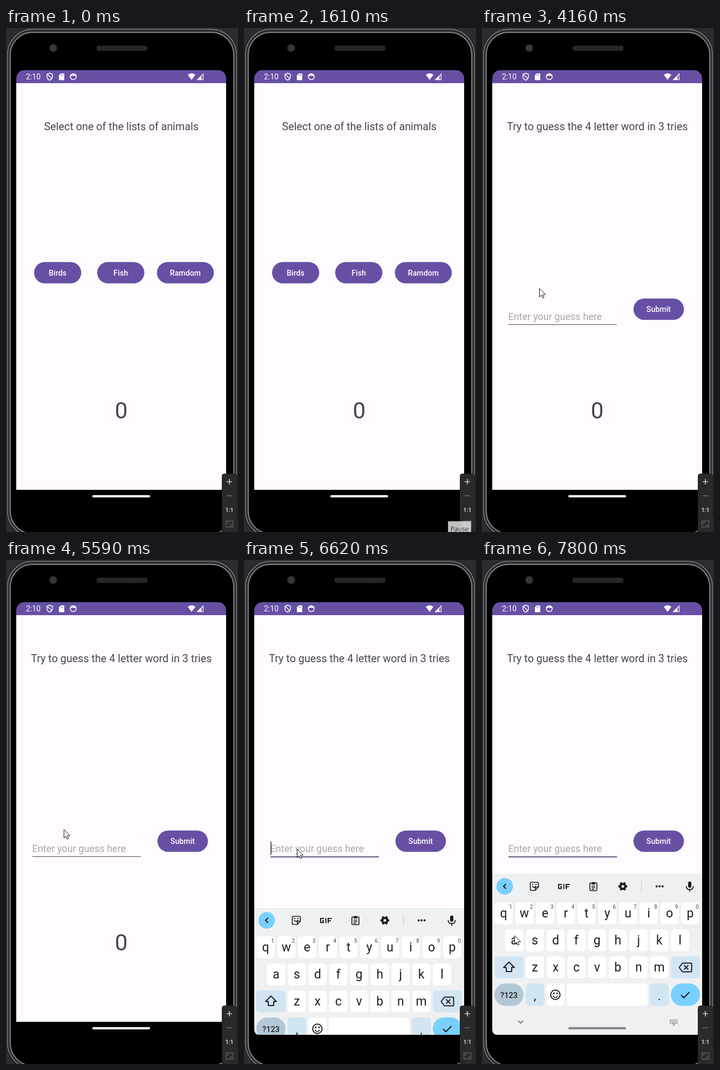
Animation, 430 px wide and 932 px high, one loop 8 s. Source, as an HTML page:

```html
<!DOCTYPE html>
<html lang="en">
<head>
<meta charset="utf-8">
<title>Guess the animal</title>
<style>
html, body { margin: 0; width: 100%; height: 100%; overflow: hidden; background: #2b2c2f; }
svg { display: block; width: 430px; height: 932px; font-family: Roboto, sans-serif; }
text { white-space: pre; }
.mid { text-anchor: middle; }
.body { font-size: 19.75px; fill: #49454f; }
.label { font-size: 14px; font-weight: 500; letter-spacing: .12px; fill: #fff; }
.key { font-size: 23px; fill: #1b1d20; }
.sup { font-size: 10px; fill: #44484c; }
.line { fill: none; stroke: #1b1d20; stroke-width: 2; }

.pick, .guess, .press, .focus, .caret, .click, .pill, .tip, .slide, .mouse {
  animation: 8s linear infinite;
}
.pick, .guess, .press, .focus, .caret, .click { animation-timing-function: step-end; }
.pick { animation-name: pick; }
.guess { animation-name: guess; }
.press { animation-name: press; }
.focus { animation-name: focus; }
.caret { animation-name: caret; }
.click { animation-name: click; }
.pill { animation-name: pill; }
.tip { animation-name: tip; }
.slide { animation-name: slide; }
.mouse { animation-name: mouse; }

@keyframes pick { 0% { opacity: 1 } 40.85%, 100% { opacity: 0 } }
@keyframes guess { 0% { opacity: 0 } 40.85%, 100% { opacity: 1 } }
@keyframes press { 0% { opacity: 0 } 39.1% { opacity: .14 } 40.85%, 100% { opacity: 0 } }
@keyframes focus { 0% { opacity: 0 } 79.3%, 100% { opacity: 1 } }
@keyframes caret {
  0% { opacity: 0 } 79.3% { opacity: 1 } 85.25% { opacity: 0 }
  91.48% { opacity: 1 } 97.4%, 100% { opacity: 0 }
}
@keyframes click {
  0% { opacity: 0 } 35.72% { opacity: 1 } 37.1% { opacity: 0 }
  76.72% { opacity: 1 } 78.1%, 100% { opacity: 0 }
}
@keyframes pill { 0%, 85.8% { fill: #fff } 88%, 100% { fill: #858689 } }
@keyframes tip {
  0%, 16.5% { opacity: 0 } 20.1%, 20.6% { opacity: .78 } 21.8%, 100% { opacity: 0 }
}
@keyframes slide {
  0%, 81.5% { transform: translateY(298px); animation-timing-function: cubic-bezier(.33, 1, .68, 1) }
  84.6%, 100% { transform: none }
}
@keyframes mouse {
  0% { transform: translate(417px, 950px); animation-timing-function: step-end }
  13.48% { transform: translate(417px, 918px) }
  14.3% { transform: translate(393px, 911px); animation-timing-function: step-end }
  14.7% { transform: translate(240px, 950px); animation-timing-function: step-end }
  21.75% { transform: translate(235px, 934px) }
  23.5% { transform: translate(184px, 856px) }
  25.1% { transform: translate(140px, 778px) }
  26.75% { transform: translate(112px, 718px) }
  28.5% { transform: translate(103px, 640px) }
  30.25% { transform: translate(101px, 568px) }
  31.9% { transform: translate(98px, 503px); animation-timing-function: ease-out }
  33.6%, 48.5% { transform: translate(94px, 465px); animation-timing-function: ease-in-out }
  51.95%, 67.25% { transform: translate(106px, 481px); animation-timing-function: ease-in }
  70% { transform: translate(107px, 499px); animation-timing-function: ease-out }
  74.95%, 91.6% { transform: translate(98px, 534px); animation-timing-function: ease-in-out }
  97.45%, 100% { transform: translate(60px, 694px) }
}
</style>
</head>
<body>
<svg viewBox="0 0 430 932">
  <defs>
    <clipPath id="screen"><path d="M19 78h389v790q0 10-10 10h-369q-10 0-10-10z"/></clipPath>
    <pattern id="mesh" width="3" height="3" patternUnits="userSpaceOnUse">
      <path fill="#1b1b1b" d="M0 0h3v3h-3z"/><path fill="#3c3c3c" d="M0 0h1.3v1.3h-1.3zM1.5 1.5h1.3v1.3h-1.3z"/>
    </pattern>
  </defs>

  <!-- phone -->
  <rect x="1" y=".5" width="428" height="942" rx="48" fill="#0c0c0d"/>
  <rect x="2.800" y="2.300" width="424.400" height="938" rx="46.500" fill="#2a2b2d" stroke="#717377" stroke-width="2"/>
  <rect x="7.800" y="8" width="414.400" height="927" rx="41.500" fill="#000" stroke="#85878c" stroke-width="2"/>
  <circle cx="87.500" cy="37" r="7.500" fill="#2c2c2e"/>
  <circle cx="87.500" cy="37" r="4" fill="#48484b"/>
  <circle cx="87.500" cy="37" r="2" fill="#252528"/>
  <rect x="168" y="33" width="94" height="9" rx="4" fill="url(#mesh)" stroke="#262626" stroke-width=".7"/>

  <!-- app -->
  <path fill="#fffbfe" d="M19 101.500h389v752.500h-389z"/>
  <path fill="#6750a4" d="M19 102v-9a15 15 0 0 1 15-15h359a15 15 0 0 1 15 15v9z"/>
  <g fill="#fff">
    <text x="37" y="95" font-size="14">2:10</text>
    <path d="M81 83.5l5 2v4.500q0 4.500-5 6.500q-5-2-5-6.500v-4.500z" fill="none" stroke="#fff" stroke-width="1.5"/>
    <path d="M77 86l8 8" stroke="#fff" stroke-width="1.5"/>
    <path d="M101.500 84h5.500q1 0 1 1v10.500q0 1-1 1h-8q-1 0-1-1v-8z"/>
    <path d="M101.700 86v2.200M103.700 86v2.200M105.700 86v2.200" stroke="#6750a4" stroke-width=".9"/>
    <circle cx="124.700" cy="90" r="5.500" fill="none" stroke="#fff" stroke-width="1.500"/>
    <path d="M119.500 89.500a5.300 5.300 0 0 1 10.400 0l-2-1.200q-3 1-4.500-.8q-1.500 1.800-3.900 2z"/>
    <path d="M337 86.500q7-5.400 14 0l-7 9.500z"/>
    <path d="M366 83.500v12.800h-12.800z"/>
    <path d="M362.300 89v6h2.400v-8.400z" fill="#6750a4"/>
  </g>
  <text class="mid" x="213.500" y="722" font-size="42" fill="#49454f">0</text>

  <g class="pick">
    <text class="body mid" x="213.800" y="188.500">Select one of the lists of animals</text>
    <g id="choices"></g>
    <rect class="press" x="52" y="432.700" width="87.500" height="39.500" rx="19.750" fill="#fff" opacity="0"/>
  </g>
  <g class="guess" opacity="0">
    <text class="body mid" x="213.800" y="188.500">Try to guess the 4 letter word in 3 tries</text>
    <g id="send"></g>
    <text x="48.500" y="539.500" font-size="18.100" fill="#aaa6ab">Enter your guess here</text>
    <path d="M49 548.500h201" stroke="#4f474f"/>
    <path class="focus" d="M49 549h201" stroke="#67527f" stroke-width="2" opacity="0"/>
    <path class="caret" d="M50 520.500v25" stroke="#3f3a45" stroke-width="1.600" opacity="0"/>
  </g>

  <!-- keyboard -->
  <g clip-path="url(#screen)">
    <g class="slide">
      <path fill="#eff0f2" d="M19 581h389v300h-389z"/>
      <path stroke="#e5e5e8" d="M19 581.500h389"/>
      <g id="keys"></g>
      <circle cx="42" cy="603.500" r="15.300" fill="#79d0ff"/>
      <path class="line" d="M44.500 599l-4.500 4.500l4.500 4.500"/>

      <path class="line" d="M91.500 596h11q2 0 2 2v7l-5.500 6h-7.500q-2 0-2-2v-11q0-2 2-2zM104 605h-3q-2 0-2 2v3.500M93 603q3.500 5 7 0" style="stroke-width:1.700"/>
      <path fill="#1b1d20" d="M93 599h2v2h-2zM99 599h2v2h-2z"/>

      <path class="line" d="M148 600h-6v7.500h5v-3.500h-2M151.700 599v9.500M156 608.500v-8.500h6.500M156 604.300h5"/>

      <rect class="line" x="200" y="597" width="13" height="14.500" rx="1.500" style="stroke-width:1.700"/>
      <path fill="#1b1d20" d="M203 596h2a1.700 1.700 0 0 1 3 0h2v4h-7z"/>
      <path class="line" d="M203 603h7M203 606h7M203 609h5" style="stroke-width:1.300"/>

      <circle class="line" cx="261" cy="603.500" r="4.600" style="stroke-width:4"/>
      <circle class="line" cx="261" cy="603.500" r="7" pathLength="12" stroke-dasharray="1 1" stroke-dashoffset=".5" style="stroke-width:2.600"/>
      <path stroke="#c5c7ca" d="M295.500 593v21"/>
      <path fill="none" stroke="#1b1d20" stroke-width="4" stroke-linecap="round" stroke-dasharray="0 5.500" d="M323.700 603.500h11.100"/>

      <rect x="382" y="594.500" width="6" height="11.500" rx="3" fill="#1b1d20"/>
      <path class="line" d="M378.500 603q0 6.500 6.500 6.500t6.500-6.500M385 609.500v4" style="stroke-width:1.800"/>

      <path class="line" d="M50 743.500l-10 10h5v7.500h10v-7.500h5z" stroke-linejoin="round"/>
      <path class="line" d="M371.500 745.500h16q1 0 1 1v14q0 1-1 1h-16l-6-8zM374.500 749.500l8 8m0-8l-8 8" stroke-linejoin="round"/>
      <circle class="line" cx="136" cy="804" r="8.700"/>
      <path class="line" d="M131.500 806q4.500 6.500 9 0" style="stroke-width:1.700"/>
      <path fill="#1b1d20" d="M131.700 800h2.800v2.800h-2.800zM137.700 800h2.800v2.800h-2.800z"/>
      <path class="line" d="M369 804.500l5 5l10.500-10.500"/>
      <path fill="none" stroke="#515457" stroke-width="1.500" d="M67 852l4.700 4.500l4.700-4.500"/>
      <path fill="none" stroke="#6c6f72" stroke-width="1.700" stroke-dasharray="1.900 1.200" d="M348 850.500h15M348 853.500h15"/>
      <path fill="none" stroke="#6c6f72" stroke-width="1.600" d="M348 856.500h2M351.500 856.500h8M361 856.500h2M353.500 859.500h4"/>
    </g>
  </g>
  <rect class="pill" x="160" y="863.800" width="107" height="4.300" rx="2.100" fill="#fff"/>

  <!-- zoom panel -->
  <rect x="400.500" y="824.500" width="27" height="120" rx="4" fill="#2a2a2b" stroke="#222223"/>
  <path stroke="#c8cad0" stroke-width="1.600" d="M409 839h10M414 834v10"/>
  <path stroke="#686b70" stroke-width="1.500" d="M409 865h10"/>
  <text class="mid" x="414" y="895" font-size="10.500" font-weight="700" fill="#ced0d6">1:1</text>
  <path fill="none" stroke="#64676c" stroke-width="1.200" d="M407.600 911.600h13v11h-13zM410.500 917v-2.500h2.500M417.500 917.500v2.500h-2.500"/>

  <g class="tip" opacity="0">
    <path fill="#f5f5f7" stroke="#d2d2d5" d="M378.500 912.500h42v30h-42z"/>
    <text class="mid" x="399.500" y="931" font-size="12" fill="#404043" style="font-family:'Open Sans',sans-serif">Pause</text>
  </g>

  <g class="mouse">
    <circle class="click" r="12" fill="#ff0" fill-opacity=".47" opacity="0"/>
    <path d="M.5.700v15.600l3.600-3.400l2.300 5.400l2.500-1.100l-2.300-5.200h5z" fill="#fff" stroke="#111" stroke-width="1"/>
  </g>
</svg>
<script>
const $ = id => document.getElementById(id);
const rect = (x, y, w, h, r, fill) =>
  `<rect x="${x}" y="${y}" width="${w}" height="${h}" rx="${r}" fill="${fill}"/>`;
const text = (cls, x, y, s) => `<text class="${cls} mid" x="${x}" y="${y}">${s}</text>`;
const button = (x, y, w, s) =>
  rect(x, y, w, 39.6, 19.8, '#6750a4') + text('label', x + w / 2, y + 25.2, s);

$('choices').innerHTML = button(52, 432.7, 87.5, 'Birds') +
  button(169, 432.7, 87.5, 'Fish') + button(279.7, 432.7, 105.5, 'Ramdom');
$('send').innerHTML = button(280.7, 500.2, 93.6, 'Submit');

const row = (letters, x, y, digits = '') => [...letters].map((c, i) => {
  const cx = x + i * 38.45;
  return rect(cx - 17, y, 34, 40.5, 6, '#fff') + text('key', cx, y + 27.5, c) +
    (digits ? text('sup', cx + 13, y + 11.5, digits[i]) : '');
}).join('');

const soft = '#d2e5f2';
$('keys').innerHTML = row('qwertyuiop', 40, 633, '1234567890') +
  row('asdfghjkl', 59.5, 683) + row('zxcvbnm', 98, 733) +
  rect(23, 733, 54, 40.5, 6, soft) + rect(350, 733, 54, 40.5, 6, soft) +
  rect(23, 783, 54, 41.5, 20.5, '#b3c8d6') +
  `<text class="mid" x="50" y="810" font-size="14.5" font-weight="500" fill="#1b1d20">?123</text>` +
  rect(81, 783, 34, 41.5, 6, soft) + text('key', 98, 813.5, ',') +
  rect(119, 783, 34, 41.5, 6, '#fff') + rect(157, 783, 150, 41.5, 6, '#fff') +
  rect(311, 783, 35, 41.5, 6, soft) + text('key', 328.5, 813.5, '.') +
  rect(350, 783, 54, 41.5, 20.5, '#79d0ff');
</script>
</body>
</html>
```
